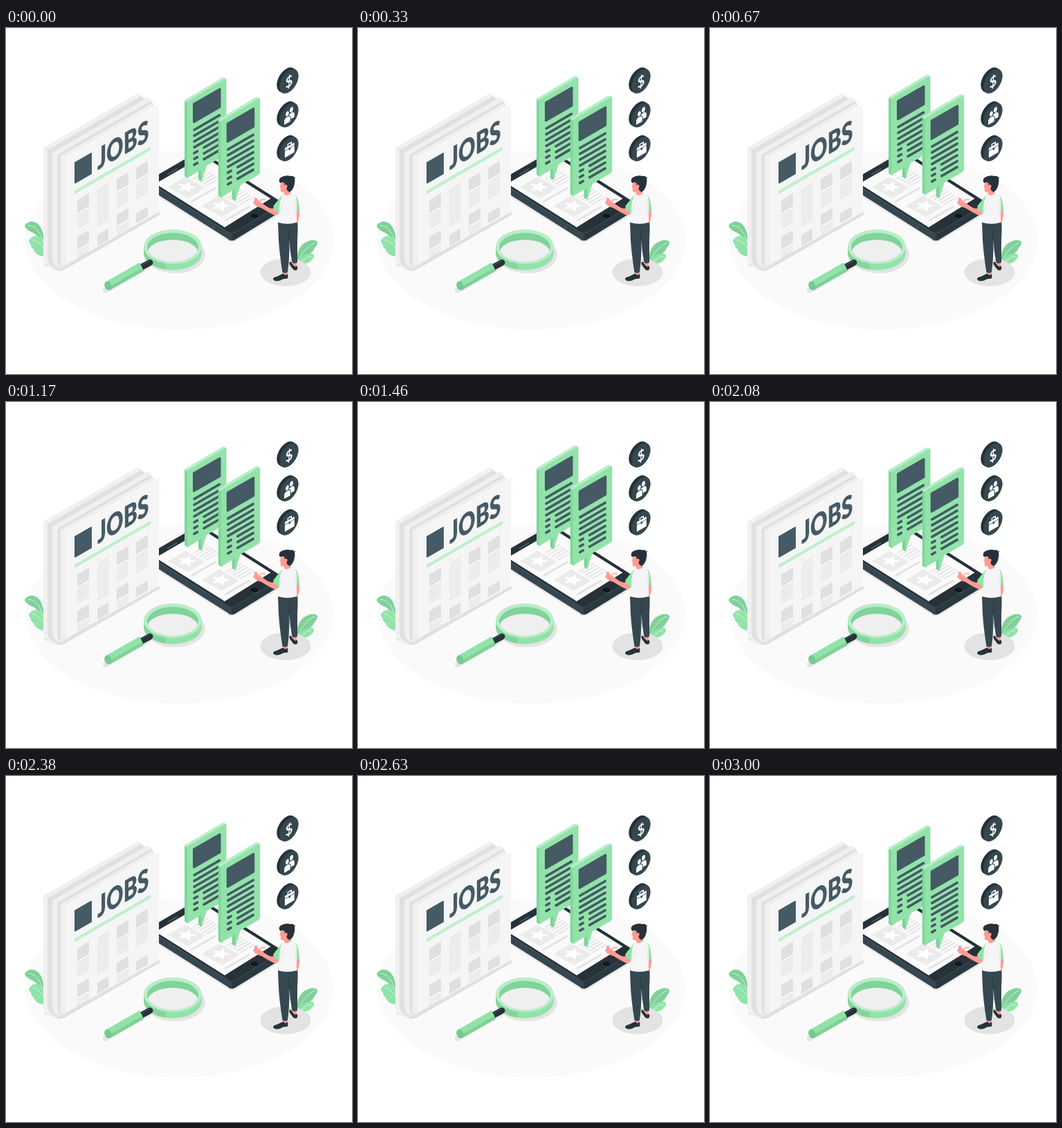
An HTML page with a canvas for the animation above (3040 ms loop, 500 by 500 pixels).

```html
<!DOCTYPE html>
<html lang="en">
<head>
<meta charset="utf-8">
<title>Job search</title>
<style>
html, body { margin: 0; width: 100%; height: 100%; overflow: hidden; background: #fff; }
canvas { display: block; width: 500px; height: 500px; }
</style>
</head>
<body>
<canvas id="stage"></canvas>
<script>
const LOOP = 3040, RISE = 9.2, K = 0.577;
const INK = '#263238', SLATE = '#37474f', STEEL = '#455a64';
const GREEN = '#92e3a9', MINT = '#b9edc8', LEAF = '#7fd199';
const GRAY = '#e0e0e0', PALE = '#f5f5f5', SKIN = '#ff9c94';

const canvas = document.getElementById('stage');
const ctx = canvas.getContext('2d');
const dpr = window.devicePixelRatio || 1;
canvas.width = canvas.height = 500 * dpr;
ctx.scale(dpr, dpr);
ctx.lineCap = ctx.lineJoin = 'round';

function fill(color, d) {
  ctx.fillStyle = color;
  ctx.fill(new Path2D(d));
}

function stroke(color, width, d) {
  ctx.strokeStyle = color;
  ctx.lineWidth = width;
  ctx.stroke(new Path2D(d));
}

function oval(color, x, y, rx, ry, turn = 0) {
  ctx.fillStyle = color;
  ctx.beginPath();
  ctx.ellipse(x, y, rx, ry, turn, 0, Math.PI * 2);
  ctx.fill();
}

// upright panel whose top edge rises to the right
function panel(color, x, y, w, h, r = 0) {
  const d = `M${x + r} ${y + r * .6}l${w - 2 * r} ${-K * (w - 2 * r)}v${h - 2 * r}l${2 * r - w} ${K * (w - 2 * r)}Z`;
  fill(color, d);
  if (r) stroke(color, 2 * r, d);
}

function rows(color, width, x, y, w, n, step) {
  for (let i = 0; i < n; i++) stroke(color, width, `M${x} ${y + i * step}l${w} ${-K * w}`);
}

function onPlane(x, y, sx, draw) {
  ctx.save();
  ctx.transform(sx, -K * sx, 0, 1, x, y);
  draw();
  ctx.restore();
}

function plants() {
  fill(LEAF, 'M27 286C30 279 40 277 47 284C54 291 55 305 57 320C50 306 45 298 37 295C31 292 28 289 27 286Z');
  fill(GREEN, 'M33 308C36 300 46 298 52 304C56 309 57 320 59 331C51 330 43 328 41 322C40 318 36 318 36 314C36 311 33 311 33 308Z');
  stroke('#e3f7e9', .8, 'M32 285C43 286 49 294 54 310M37 306C47 307 53 315 58 328');
  fill(LEAF, 'M420 344C419 326 424 312 437 308C444 305 451 307 450 311C449 315 446 317 445 320C441 328 429 331 420 344Z');
  fill(GREEN, 'M420 346C423 333 433 325 441 326C447 327 446 332 442 335C438 342 427 339 420 346Z');
  stroke('#e3f7e9', .8, 'M421 342C425 327 434 316 446 310M422 343C427 336 434 331 442 330');
}

function sheet(color, x, y, right) {
  const bottom = 351 - (x - 54) * .3;
  fill(color, `M${x} ${y}L${right} ${y - K * (right - x)}l6 4V266L87 342C77 ${bottom + 2} ${x} ${bottom} ${x} 329Z`);
}

function article(x, y, h, n) {
  panel(GRAY, x, y, 17, h);
  rows('#dedede', 1.2, x + .5, y + h + 4, 16, n, 3.7);
}

function newspaper() {
  fill(GRAY, 'M54 343L88 325L222 266V270L87 348Q80 353 72 350Z');
  sheet('#f0f0f0', 54, 173, 191);
  sheet('#e0e0e0', 60, 176.5, 195);
  sheet('#f0f0f0', 67, 180, 205);
  sheet('#e0e0e0', 74.5, 183, 208);
  sheet('#f0f0f0', 79, 185, 211);
  fill(PALE, 'M86 188L219 111Q221 110 221 113V266L87 342Q86 342 86 340Z');
  stroke('#fff', .8, 'M86 188L219 111');

  panel(STEEL, 99, 194, 25, 31, 1);
  onPlane(132, 205.5, .7, () => {
    ctx.fillStyle = STEEL;
    ctx.font = '900 43px Lato, "Open Sans", sans-serif';
    ctx.fillText('JOBS', 0, 0);
  });
  panel('#bff0cc', 99, 235, 110, 5);

  article(103, 249, 18, 6);
  rows('#dedede', 1.2, 132.5, 234, 16, 15, 3.7);
  article(160, 218, 18, 6);
  article(188, 202, 18, 7);
  article(103, 302, 18, 3);
  panel(GRAY, 132, 299, 16, 16);
  article(160, 270, 16, 3);
  panel(GRAY, 188, 268, 17, 14);
}

function star(x, y) {
  ctx.save();
  ctx.transform(.87, .5, .87, -.5, x, y);
  ctx.beginPath();
  for (let i = 0; i < 10; i++) {
    const a = i * Math.PI / 5 + Math.PI / 4, r = i % 2 ? 5.2 : 12;
    ctx.lineTo(r * Math.cos(a), r * Math.sin(a));
  }
  ctx.closePath();
  ctx.fillStyle = '#fff';
  ctx.fill();
  ctx.restore();
}

function card(x, y) {
  fill('#ebebeb', `M${x - 27} ${y}l25 -15l29 16l-25 15Z`);
  star(x, y);
  for (let i = 0; i < 5; i++) {
    stroke('#e2e2e2', 1.6, `M${x + 10 + i * 4.5} ${y - 12 + i * 2.6}l20 -11.5`);
  }
  stroke('#e2e2e2', 2.6, `M${x + 7} ${y + 21}l34 -19.5`);
}

function phone() {
  fill('#e8e8e8', 'M218 243L322 308Q327 311 332 308L402 266L390 255Z');
  fill('#2b383f', 'M320 294L400 250Q402 258 396 266L331 306Q328 308 326 307Z');
  fill(SLATE, 'M204 221L326 298V307Q323 308 321 305L204 231Z');
  fill(INK, 'M204 221L275 180Q280 177 285 180L396 250Q401 253 396 256L331 295Q326 298 321 295Z');
  stroke(STEEL, .8, 'M204 221L321 295Q326 298 331 295L396 256');
  fill('#fafafa', 'M216 225L285 185L382.5 246.6L316 288Z');
  stroke(STEEL, 2, 'M234 211L247 203.5');
  oval('#10191d', 359, 272, 6, 3.5);
  stroke(STEEL, .8, 'M353 272A6 3.5 0 0 0 365 272');
  card(261, 230);
  card(310, 257);
}

function bubble(x, y) {
  ctx.save();
  ctx.translate(x, y);
  fill(LEAF, 'M20 99V115L25 118V99Z');
  fill('#83d69c', 'M0 2Q0 0 2 -1L6 2V113L1 111Q0 110 0 108Z');
  fill(MINT, 'M0 2Q0 0 2 -1L54 -32Q56 -33 58 -32L61 -30L5 3Z');
  fill(GREEN, 'M4 4Q4 2 6 1L58 -30Q60.5 -31 60.5 -28V76Q60.5 78 58 80L32 95L25 117L24 101L7 111Q4 113 4 110Z');
  panel(STEEL, 12, 5, 40.5, 29, 1.5);
  rows(STEEL, 3.6, 14, 43.2, 36.5, 4, 8.4);
  rows(STEEL, 3.6, 14, 76.8, 4.5, 3, 8.4);
  rows(STEEL, 3.6, 28, 68.8, 22.5, 3, 8.4);
  ctx.restore();
}

function disc(y, draw) {
  for (let i = 4; i >= 0; i--) {
    onPlane(409 - i, y - i * .577, .866, () => oval(i ? INK : SLATE, 0, 0, 15.8, 15.8));
  }
  onPlane(409, y, .866, draw);
}

function icons() {
  disc(77, () => {
    ctx.fillStyle = '#fff';
    ctx.font = 'bold 21px Lato, "Open Sans", sans-serif';
    ctx.textAlign = 'center';
    ctx.fillText('$', 0, 8);
    ctx.textAlign = 'start';
  });
  disc(126, () => {
    oval('#fff', 4, -6, 2.9, 3.6);
    fill('#fff', 'M-1 7V3Q-1 -1.5 4 -1.5Q9 -1.5 9 3V7Z');
    oval(SLATE, -3, -3.5, 3.6, 4.3);
    fill(SLATE, 'M-9 11V5Q-9 0 -3 0Q3 0 3 5V11Z');
    oval('#fff', -3, -3.5, 2.7, 3.5);
    fill('#fff', 'M-8 10V5Q-8 1 -3 1Q2 1 2 5V10Z');
  });
  disc(175, () => {
    fill('#fff', 'M-7 -5H9V9H-7Z');
    stroke('#fff', 1.5, 'M-2 -5V-8H4V-5');
    stroke(SLATE, .7, 'M-7 -1H9');
    fill(SLATE, 'M-.5 -1.5H2.5V1.5H-.5Z');
  });
}

function magnifier() {
  oval('#e4e4e4', 244, 327.5, 44, 27);
  stroke('#e4e4e4', 8, 'M144 379L205 344');
  fill(GREEN, 'M199 316V325A42 25 0 0 0 283 325V316Z');
  fill('#83d59c', 'M199 316V325A42 25 0 0 0 231 349V339Z');
  oval(MINT, 241, 316, 42, 25);
  oval('#81d39a', 241, 317, 37, 21);
  ctx.save();
  ctx.beginPath();
  ctx.ellipse(241, 317, 37, 21, 0, 0, Math.PI * 2);
  ctx.clip();
  oval('#efefef', 241, 326, 37, 20);
  ctx.restore();
  stroke(INK, 9, 'M193 347L208 339');
  stroke(SLATE, 2, 'M194 344L207 336.5');
  ctx.lineCap = 'butt';
  stroke(LEAF, 13, 'M148 372.5L196 345');
  stroke(GREEN, 8.5, 'M146.5 370.5L195 343');
  ctx.lineCap = 'round';
  oval('#74c98f', 147.5, 372.5, 5, 6.8, -.4);
}

function man() {
  oval('#e3e3e3', 404, 353, 36.5, 20);
  // feet and shoes
  fill(SKIN, 'M400 350H406.5V358H400ZM414 335H420V346H414Z');
  fill(INK, 'M386 363Q386 360 392 359L400 355Q405 359 407 355Q408 358 407 362Q400 362 396 365Q388 367 386 363Z');
  fill(INK, 'M410 338Q412 337 415 343Q418 346 421 344Q422 348 420 350Q415 351 413 346Q408 341 410 338Z');
  // trousers
  fill(SLATE, 'M393 281L421.5 279Q422 292 421 306Q421 322 421 339Q417 341 413.5 339Q410 322 409.5 306Q410 330 407 353Q403 355 399.5 353Q395 325 394 306Z');
  stroke(INK, .8, 'M409.5 307L408 293');
  // far arm
  fill(SKIN, 'M359 246Q362 243 364 249L370 253Q378 260 385 261L396 252L400 264L389 271Q380 267 369 260Q363 259 358 254Q356 251 359 250Z');
  stroke('#ffc0b8', 2.6, 'M366 251Q369 247 374 248');
  fill(GREEN, 'M400 241Q394 247 386 258Q389 266 397 268L404 260Z');
  // near arm
  fill(SKIN, 'M418 260L424 262Q425 272 421 282Q418 281 418 276Z');
  fill(GREEN, 'M414 240Q421 241 422 249L424.5 263Q421 266 417 264Z');
  // neck, shirt and head
  fill(SKIN, 'M402 232L411 230L412 243L402 244Z');
  fill(PALE, 'M401 240Q407 244 412 238Q419 240 420 247L420 281Q407 285 393 281L395 266Q395 246 401 240Z');
  stroke('#dedede', .7, 'M396 265Q400 256 402 248M417 248Q419 260 418 270');
  fill(SKIN, 'M396 221Q403 218 408 224L409 235Q403 239 398 237Q396 235 397 231L395 230L397 226Z');
  fill(INK, 'M396 224Q393 219 397 216Q404 212 411 214Q416 213 417 217Q418 221 416.5 227Q415 234 410 237Q406 236 405 231Q402 229 402.5 224Q399 222 396 224Z');
  oval(SKIN, 404.5, 229, 2, 2.8);
  stroke(INK, 1, 'M415 217L418 216');
}

function frame(now) {
  const p = now % LOOP / LOOP;
  const lift = RISE * (1 - Math.abs(2 * p - 1));
  ctx.fillStyle = '#fff';
  ctx.fillRect(0, 0, 500, 500);
  oval('#fafafa', 250.5, 307, 222.5, 129);
  plants();
  phone();
  newspaper();
  bubble(258, 104 - lift);
  bubble(306.7, 132.3 - lift);
  icons();
  magnifier();
  man();
  requestAnimationFrame(frame);
}
frame(performance.now());
</script>
</body>
</html>
```
